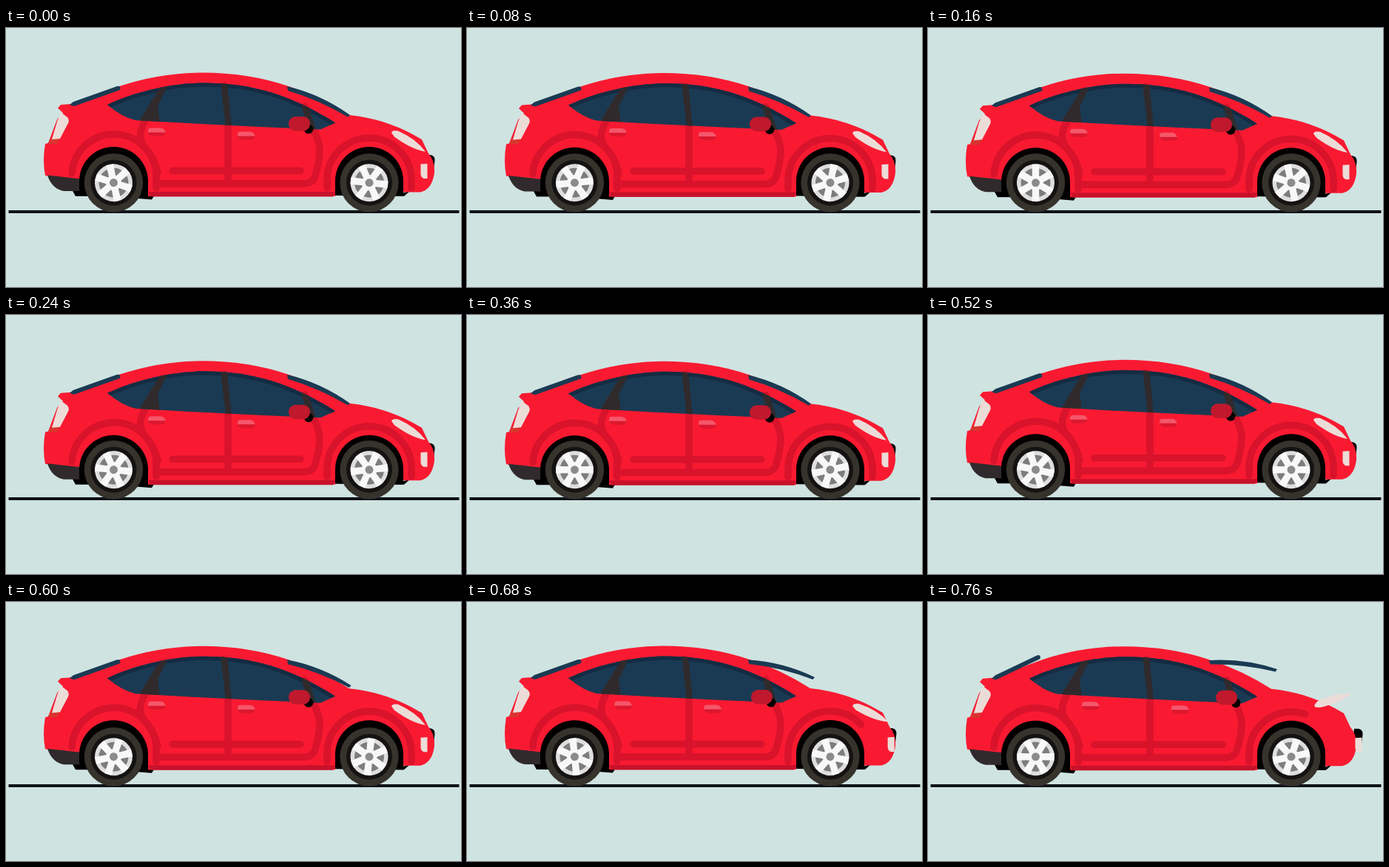
An HTML page for the animation above (0.8 s loop, 615 px wide and 351 px high).

```html
<!DOCTYPE html>
<html lang="en">
<head>
<meta charset="utf-8">
<title>Car</title>
<style>
  html, body { margin: 0; height: 100%; overflow: hidden; background: #cfe3e1; }
  svg { display: block; width: 615px; height: 351px; }
  .seam { fill: none; stroke: #d8132b; stroke-width: 9.5; stroke-linecap: round; stroke-linejoin: round; }
  .red { fill: #f91a31; }
  .navy { fill: #1a3a53; }
  .cream { fill: #ecdcd8; }
  .pillar { fill: #302a2c; }
</style>
</head>
<body>
<svg viewBox="0 0 615 351">
  <defs>
    <path id="glass" d="M137 104 C175 86 225 74.500 268 74.500 C330 74.500 385 90 445 128.500 L425 137.500 Q300 132.500 175 125 Q157 121 137 104Z"/>
    <clipPath id="pane"><use href="#glass"/></clipPath>
    <g id="tyre">
      <circle r="39.700" fill="#36322c"/>
      <circle r="31" fill="#141312"/>
    </g>
    <g id="rim">
      <circle r="25.500" fill="#dedede"/>
      <circle r="20" fill="#7d7d7d"/>
      <g id="spokes" fill="#f8f8f8"></g>
      <circle r="10.500" fill="#f8f8f8"/>
      <circle r="5.500" fill="#8b8b8b"/>
    </g>
    <g id="handle">
      <path d="M0 6.500 V4 Q0 0 4 0 H17 Q22 0 24 6.500Z" fill="#f5566a"/>
      <path d="M0 6 H24 Q23 11 18 11 H6 Q1 10 0 6Z" fill="#dc172e"/>
    </g>
  </defs>

  <path d="M3.500 249 H612.500" stroke="#101318" stroke-width="4"/>

  <g id="body">
    <path d="M89 219 L94 228 H120 L178 231 L197 232.500 L201 226 V215 H100Z M520 228 H538 L546 221Z"/>
    <path id="nose" d="M568 172 H574 Q580 173 579.500 180 L578 192 H566Z"/>
    <path class="red" d="M70 108.500 L74 104 L88 103 L153 79 Q208 60.500 265 60.500 Q328 60.500 382 79 Q425 93 464 118
      C505 122 537 136 562 151 L571 170 Q580 180 579 196 Q576 219 560 222.500 H537 L445 222 V228 H192 V207 H100 L53 200 Q49 180 53 157 L57 156 L69 124 L77 115Z"/>
    <path d="M192 222 H446 L442 228.500 H196Z" fill="#c8112a"/>
    <path class="pillar" d="M56 199.500 L101 204.500 V221 H78 Q62 218 56 199.500Z"/>

    <g class="seam">
      <path d="M89 197 A57 57 0 0 1 203 205 V217"/>
      <path id="arch" d="M434 217 V206 A57 57 0 0 1 548 206 V217"/>
      <path d="M212 84 Q194 112 184 134 Q178 148 186 160 Q200 174 205 196"/>
      <path d="M208 211 H402 Q415 211 418 200 Q424 180 424 163 Q422 148 413 134 L404 106"/>
      <path d="M225 193.500 H398 M295 78 L300 130 V204"/>
    </g>
    <path d="M99 220 V207.500 A46.500 46.500 0 0 1 192 207.500 V226 H110Z M445 227 V207 A46 46 0 0 1 537 207 V228Z"/>

    <use href="#glass" class="navy"/>
    <g clip-path="url(#pane)">
      <path d="M137 104 C175 86 225 74.500 268 74.500 C330 74.500 385 90 445 128.500" fill="none" stroke="#142b42" stroke-width="10"/>
      <path class="pillar" d="M207 82 L218 79 L205 106 L208 128 L180 126Z M290 73 L299 73 L305 134 H297Z M398 100 L408 104 L419 138 H408Z"/>
    </g>

    <path d="M63 147 L78 140 L69 157 H56Z" fill="#d9352f"/>
    <path class="cream" d="M74 114 L83 121 Q86 125 84 129 L73 150 L62 151 L69 127Z"/>

    <path id="spoiler" class="navy" d="M86 104 L91 100 L150 79 Q156 78 154 84 L92 106Z"/>
    <path id="screen" class="navy" d="M380 79 Q426 90 465 118 L462 120.500 Q422 97 381 85Z"/>
    <path id="headlight" class="cream" d="M521 142 Q522 138 530 139.500 Q554 150 567 167.500 Q549 165 525 147.500Z"/>
    <path id="fog" class="cream" d="M560.500 184.500 L569.500 184 V204 H565 Q561 203 560.500 198Z"/>
    <g id="handles">
      <use href="#handle" x="192" y="135.500"/>
      <use href="#handle" x="313" y="140.500"/>
    </g>
    <g id="mirror">
      <circle cx="409" cy="137" r="6.300"/>
      <rect x="382" y="120" width="29" height="19.500" rx="9.500" fill="#c0182c"/>
    </g>
  </g>

  <g transform="translate(145.500 209.700)"><use href="#tyre"/><use id="rearRim" href="#rim"/></g>
  <g transform="translate(491 209.700)"><use href="#tyre"/><use id="frontRim" href="#rim"/></g>
</svg>
<script>
const LOOP = 800, STEP = 40;
const el = id => document.getElementById(id);
const place = (id, value) => el(id).setAttribute('transform', value);
const shift = (id, x, y = 0) => place(id, `translate(${x} ${y})`);
const turn = (id, angle, x = 0, y = 0) => place(id, `rotate(${angle} ${x} ${y})`);
const archLength = el('arch').getTotalLength();

for (let a = 0; a < 360; a += 60)
  el('spokes').innerHTML += `<path d="M-4.500 -8 L-5 -25 H5 L4.500 -8Z" transform="rotate(${a})"/>`;

// Slow sink, quicker rise
function bob(t) {
  const p = (t + 160) % LOOP;
  return p < 500 ? -1.2 + 3.8 * p / 500 : 2.6 - 3.8 * (p - 500) / 300;
}

function draw(now) {
  const t = Math.floor(now % LOOP / STEP) * STEP;
  const since = start => Math.max(0, t - start);
  const spin = t / LOOP * 360;

  shift('body', 0, bob(t));
  turn('rearRim', spin - 12);
  turn('frontRim', spin - 24);

  // Loose parts fly off before the loop snaps back
  turn('screen', -since(570) * .091, 381, 82);
  turn('spoiler', -since(690) * .085, 88, 104);
  turn('headlight', -since(670) * .55, 523, 140);
  shift('handles', since(612) * .107);
  shift('fog', since(606) * .11);
  shift('mirror', since(650) * .064);
  shift('nose', since(670) * .089);

  const p = since(600) / 200;
  const trim = 85 * (1 - (1 - p) ** 2);
  el('arch').setAttribute('stroke-dasharray', `${archLength - trim} 400`);
  requestAnimationFrame(draw);
}
draw(0);
</script>
</body>
</html>
```
